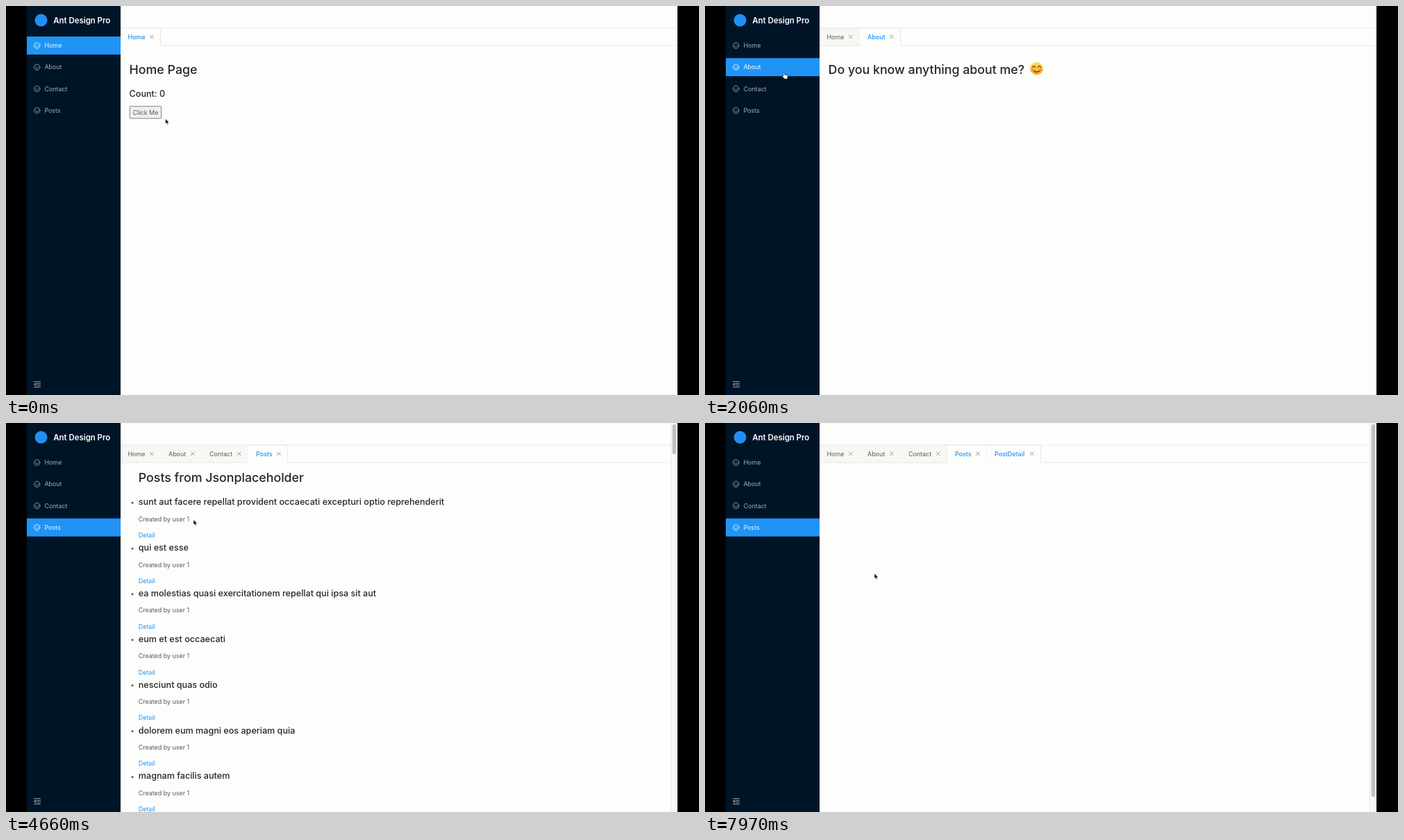
Recreate the animation shown at these times as an HTML page. Size 998x561 px, loop 8000 ms.

```html
<!DOCTYPE html>
<html lang="en">
<head>
<meta charset="utf-8">
<title>Tabbed admin layout</title>
<style>
  html, body { margin: 0; width: 100%; height: 100%; overflow: hidden; background: #000; }
  svg { display: block; width: 998px; height: 561px; }
  text { font: 400 8.92px Inter, "Open Sans", sans-serif; font-optical-sizing: none; fill: #595959; white-space: pre; }
  .brand { font-size: 11.4px; font-weight: 600; fill: #fff; }
  .h1 { font-size: 17.8px; font-weight: 500; fill: #262626; }
  .h2 { font-size: 12.6px; font-weight: 500; fill: #262626; }
  .link { fill: #2492ee; }
  .on { fill: #2090f0; font-weight: 500; }
  .rule { stroke: #e5e8ec; stroke-width: 1; fill: none; }
  .close { stroke: #858585; stroke-width: .8; }
  .button { fill: #efefef; stroke: #767676; stroke-width: .9; }
  .icon { fill: none; stroke: #fff; stroke-width: .85; stroke-linecap: round; }
  .face { fill: none; stroke: #6b3b12; stroke-width: 1.3; stroke-linecap: round; }
</style>
</head>
<body>
<svg id="stage" viewBox="0 0 998 561" xmlns="http://www.w3.org/2000/svg"></svg>
<script>
const LOOP = 8000, FADE = 300;
const menuNames = ['Home', 'About', 'Contact', 'Posts'];
const tabNames = [...menuNames, 'PostDetail'];
const tabEdges = [165, 222.5, 281.5, 348.5, 405.5, 483.5];
const posts = [
  'sunt aut facere repellat provident occaecati excepturi optio reprehenderit',
  'qui est esse',
  'ea molestias quasi exercitationem repellat qui ipsa sit aut',
  'eum et est occaecati',
  'nesciunt quas odio',
  'dolorem eum magni eos aperiam quia',
  'magnam facilis autem'
];
const postStep = 65.9, menuStep = 31.2;

// Timeline: [time, value]
const openTimes = [0, 1450, 2530, 3820, 5480];
const menuPicks = [[-FADE, 0], [1560, 1], [2645, 2], [3950, 3]];
const tabPicks = [...menuPicks, [5600, 4], [6900, 3], [8060, 4]];
const pages = [[0, 'home'], [1450, 'about'], [2530, 'contact'], [3820, 'posts'], [4250, 'list'],
  [5480, 'blank'], [5850, 'detail'], [6900, 'list'], [7950, 'blank']];
const freshTabs = [[1, 1450, 1860], [2, 2530, 2945], [3, 3820, 4250], [4, 5480, 5900], [4, 7950, LOOP]];
const path = [
  [0, 229.5, 162.5], [150, 229.5, 162.5], [950, 116, 92], [1470, 112, 93], [2000, 112, 93],
  [2350, 112, 121], [2550, 112, 122], [2780, 110.5, 142], [3150, 97, 152], [3840, 92, 153],
  [4050, 92, 153], [4450, 267, 139], [4660, 270, 139.5], [4900, 270, 139.5], [5250, 204, 161],
  [5550, 204, 161], [6100, 230, 142], [6690, 361, 51], [6950, 363, 50], [7500, 206, 226],
  [7820, 205, 226], [7970, 244, 217], [8000, 245, 217]
];

const text = (x, y, label, cls = '', extra = '') => `<text x="${x}" y="${y}" class="${cls}" ${extra}>${label}</text>`;
const rect = (x, y, w, h, fill, extra = '') => `<rect x="${x}" y="${y}" width="${w}" height="${h}" fill="${fill}" ${extra}/>`;
const button = (x, y, w, h, label) =>
  `<rect class="button" x="${x}" y="${y}" width="${w}" height="${h}" rx=".8"/>` + text(x + 4.6, y + h / 2 + 3.2, label);
const emoji = (x, features) =>
  `<g transform="translate(${x} 90)"><circle r="9.3" fill="url(#skin)"/>${features}</g>`;
const eyes = '<path class="face" d="M-5.8-1.7q2-3.4 4 0M1.8-1.7q2-3.4 4 0"/>';
const smiling = eyes + '<path class="face" d="M-4.4 3.2q4.4 4 8.8 0"/>' +
  '<g fill="#f4703c" opacity=".55"><circle cx="-6.2" cy="1.8" r="2.1"/><circle cx="6.2" cy="1.8" r="2.1"/></g>';
const grinning = eyes + '<path d="M-6 .8H6Q5.2 7-0 7T-6 .8" fill="#71351c"/>' +
  '<path d="M-5.7 1H5.7L5 3.4H-5z" fill="#fff"/><path d="M-3 5.8q3-2 6 0q-3 2-6 0" fill="#e94b4b"/>';

const menuItem = (name, i) => {
  const y = 57 + i * menuStep;
  return rect(30, y - 13, 135, 26, '#2094f5', `id="pick${i}"`) +
    `<g id="menu${i}"><g class="icon" transform="translate(44.6 ${y})"><circle r="4.2"/>
      <path d="M-1.9 .9q1.9 2.4 3.8 0M-1.7-1v.1M1.7-1v.1"/></g>
      ${text(55.4, y + 3.2, name, '', 'style="fill:#fff"')}</g>`;
};

const tab = (name, i) => {
  const left = tabEdges[i], right = tabEdges[i + 1], x = left + (i ? 11.5 : 10.5);
  return `<g id="tab${i}">
    ${rect(left, 32.5, right - left, 25, '#fdfdfc')}
    <g id="off${i}">${rect(left, 32.5, right - left, 25, '#f7f7f4')}
      <path class="rule" d="M${left} 57H${right}"/>${text(x, 47.5, name, '', `id="label${i}"`)}</g>
    ${text(x, 47.5, name, 'on', `id="on${i}"`)}
    <path class="rule" d="M${left} 32H${right}V57"/>
    <path class="close" d="M${right - 15.4} 41.6l5.4 5.4m0-5.4l-5.4 5.4"/></g>`;
};

const post = (title, i) => `<g transform="translate(0 ${i * postStep})">
  <circle cx="182" cy="115" r="1.5" fill="#555"/>
  ${text(190.8, 118, title, 'h2')}${text(190.8, 141.7, 'Created by user 1')}${text(190.8, 164.9, 'Detail', 'link')}</g>`;

const page = (id, body) => `<g id="${id}" class="page">${body}</g>`;
const postsHeading = text(190.8, 84.6, 'Posts from Jsonplaceholder', 'h1');

stage.innerHTML = `
  <defs><linearGradient id="skin" x2="0" y2="1"><stop stop-color="#ffe458"/><stop offset="1" stop-color="#f6a72c"/></linearGradient></defs>
  ${rect(0, 0, 998, 561, '#000')}
  ${rect(165, 0, 802, 561, '#fdfdfc')}
  ${rect(29.5, 0, 135.5, 561, '#001427')}
  <circle cx="50.5" cy="20.6" r="9" fill="#218ff2"/>
  ${text(68.3, 24.7, 'Ant Design Pro', 'brand')}
  ${menuNames.map(menuItem).join('')}
  <path class="icon" opacity=".75" d="M40.5 541.7h9M44 544.3h5.5M44 546.9h5.5M40.5 549.5h9M42 544.2l-1.6 1.4 1.6 1.4z"/>
  <path class="rule" d="M165 32H967"/>
  <path class="rule" id="baseline"/>
  ${tabNames.map(tab).join('')}
  ${page('home', text(177.6, 97.8, 'Home Page', 'h1') + text(177.6, 131, 'Count: 0', 'h2') + button(178.2, 144.7, 45.4, 17.4, 'Click Me'))}
  ${page('about', text(177.6, 97.8, 'Do you know anything about me?', 'h1') + emoji(477.6, smiling))}
  ${page('contact', text(177.6, 97.8, 'Contact me if you need me..', 'h1') + emoji(431, grinning) +
    text(177.6, 138, 'Count2: 0', 'h1') + button(178.2, 156.2, 26.6, 17.6, 'Add'))}
  ${page('posts', postsHeading)}
  ${page('list', postsHeading + posts.map(post).join(''))}
  ${page('blank', '')}
  ${page('detail', text(177.6, 97.8, posts[0], 'h1') +
    text(177.6, 126, 'quia et suscipit suscipit recusandae consequuntur expedita et cum reprehenderit molestiae ut ut quas totam nostrum rerum est autem sunt rem eveniet architecto'))}
  <g id="scrollbar">${rect(957, 0, 10, 561, '#f8f8f7')}<path class="rule" d="M957.5 0V561"/>
    ${rect(959.6, 2, 5.6, 43, '#c1c1c1', 'rx="2.8" id="thumb"')}</g>
  <g id="cursor">
    <path id="arrow" d="M0 0V7.6L1.8 6 3 8.7 4.3 8.1 3.1 5.5H5.5z" fill="#000" stroke="#fff" stroke-width=".6"/>
    <path id="hand" d="M.3 1Q1.2-.5 2.1 1L2.7 3.8 6 4.3Q7.6 4.7 7.3 6.5L6.6 9.9H2.4L-.8 6.4Q-1 5.2.2 5.5L1 6z" fill="#fff" stroke="#111" stroke-width=".7"/>
  </g>`;

const find = id => document.getElementById(id);
const show = (id, visible) => find(id).style.display = visible ? '' : 'none';
const fade = (id, amount) => find(id).style.opacity = amount;
const smooth = p => p * p * (3 - 2 * p);
const clamp = p => Math.min(1, Math.max(0, p));
const latest = (list, t) => list.findLastIndex(entry => entry[0] <= t);

function pickLevel(picks, item, t) {
  const k = latest(picks, t), p = smooth(clamp((t - picks[k][0]) / FADE));
  if (picks[k][1] === item) return k ? p : 1;
  return k && picks[k - 1][1] === item ? 1 - p : 0;
}

function pointer(t) {
  const k = Math.min(latest(path, Math.max(0, t)), path.length - 2);
  const [t0, x0, y0] = path[k], [t1, x1, y1] = path[k + 1];
  const p = smooth(clamp((t - t0) / (t1 - t0)));
  return [x0 + (x1 - x0) * p, y0 + (y1 - y0) * p];
}

function render(t) {
  const current = pages[latest(pages, t)][1];
  document.querySelectorAll('.page').forEach(el => show(el.id, el.id === current));

  const [x, y] = pointer(t), [lagX, lagY] = pointer(t - 150);
  menuNames.forEach((_, i) => {
    const level = pickLevel(menuPicks, i, t);
    const hover = lagX < 165 && Math.abs(lagY - 57 - i * menuStep) < 13;
    fade('pick' + i, level);
    fade('menu' + i, hover ? 1 : .65 + .3 * level);
  });

  const overTabs = x > 165 && y > 32 && y < 57;
  tabNames.forEach((_, i) => {
    const fresh = freshTabs.some(([n, from, to]) => n === i && t >= from && t < to);
    const level = fresh ? 1 : pickLevel(tabPicks, i, t);
    const hover = overTabs && x > tabEdges[i] && x < tabEdges[i + 1];
    show('tab' + i, t >= openTimes[i]);
    fade('off' + i, 1 - level);
    fade('on' + i, level);
    find('label' + i).style.fill = hover ? '#40a0f5' : '';
  });

  const scrolls = t >= 4250;
  const lastEdge = tabEdges[latest(openTimes.map(v => [v]), t) + 1];
  find('baseline').setAttribute('d', `M${lastEdge} 57H${scrolls ? 957 : 967}`);
  show('scrollbar', scrolls);
  find('thumb').setAttribute('height', current === 'list' ? 43 : 537);

  const overLink = current === 'list' && x > 190 && x < 216 && Math.abs((y - 161.5) % postStep) < 6;
  const pointing = x < 165 || overTabs || overLink;
  show('hand', pointing);
  show('arrow', !pointing);
  find('cursor').setAttribute('transform', `translate(${x} ${y})`);
}

const start = performance.now();
function tick() {
  render((performance.now() - start) % LOOP);
  requestAnimationFrame(tick);
}
tick();
</script>
</body>
</html>
```
